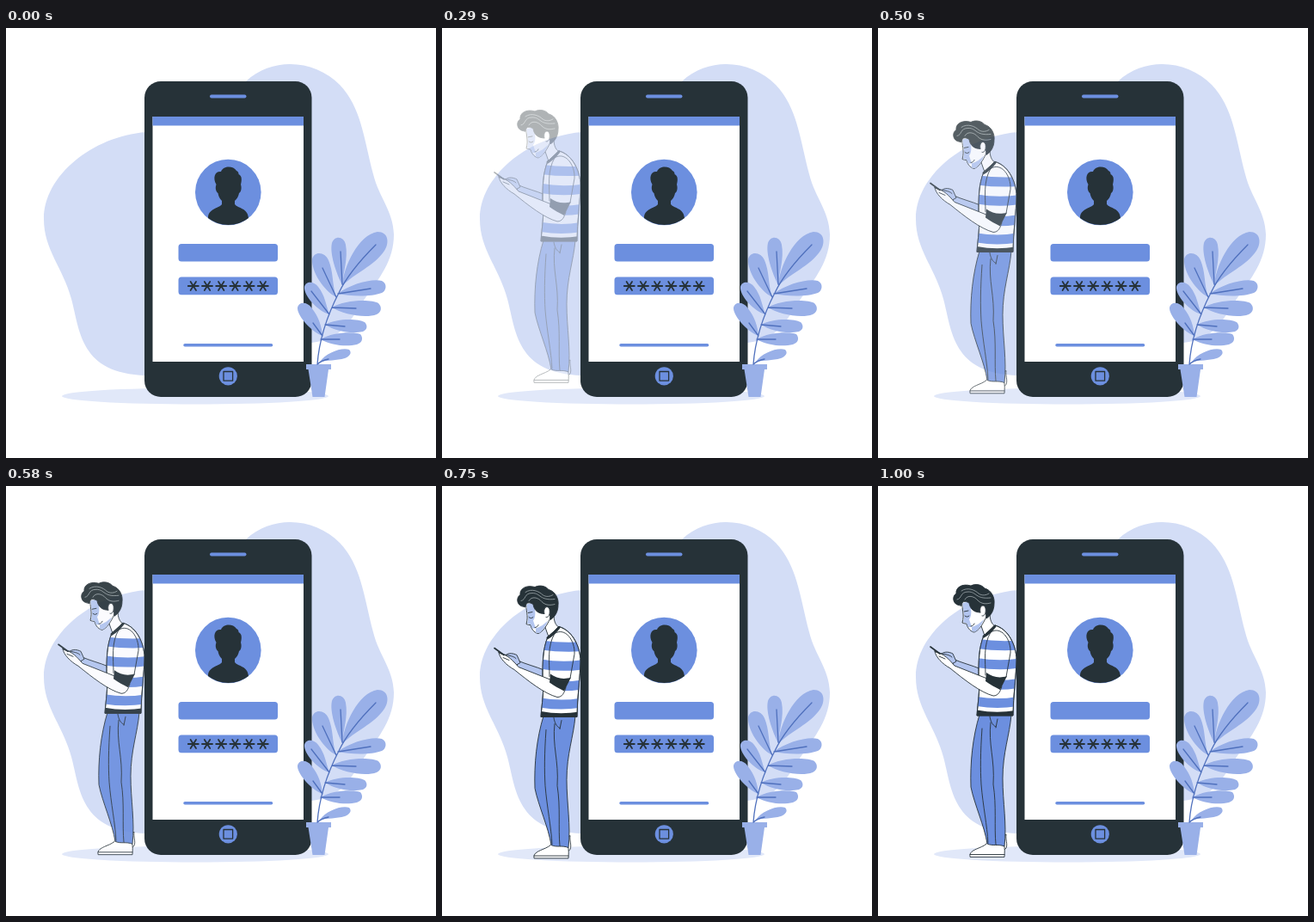
These frames come from a looping animation (500 px wide and 500 px high, 1.04 s). An HTML page:

```html
<!DOCTYPE html>
<html lang="en">
<head>
<meta charset="utf-8">
<title>Login illustration</title>
<style>
  html, body { margin: 0; width: 100%; height: 100%; overflow: hidden; background: #fff; }
  svg { display: block; width: 100vw; height: 100vh; }
  .blue { fill: #6c8fdf; }
  .dark { fill: #263238; }
  .line { fill: none; stroke: #263238; stroke-linecap: round; stroke-linejoin: round; }
  .leaf { fill: #99b0e8; }
  .vein { fill: none; stroke: #4f70bd; stroke-width: 1.3; stroke-linecap: round; }
  #person { stroke: #263238; stroke-width: .9; stroke-linecap: round; stroke-linejoin: round; }
  #person .plain { stroke: none; }
  #person .shade { fill: #b3c5ef; }
</style>
</head>
<body>
<svg viewBox="0 0 500 500">
  <defs>
    <clipPath id="shirtClip">
      <path id="shirt" d="M123 174L136 162C150 166 159 181 161 199C161 222 157 243 157 267L115 267C116 251 119 238 117 222C117 204 117 188 123 174Z"/>
    </clipPath>
    <path id="star" d="M-6 0H6M-3.2 -5L3.2 5M3.2 -5L-3.2 5"/>
  </defs>

  <path fill="#d3ddf6" d="M163 121C100 126 44 172 44 222C44 258 66 278 76 315C86 352 86 402 163 404L355 366C392 362 400 340 415 318C435 290 451 270 451 240C450 212 434 198 427 170C416 128 413 92 388 66C360 38 312 32 279 62Z"/>
  <ellipse cx="220" cy="428" rx="155" ry="9.5" fill="#e1e8f9"/>

  <g id="person" fill="#fff">
    <!-- shoes and trousers -->
    <path d="M144 408L149 405C148 411 151 416 149 421L146 424Z"/>
    <path d="M107 431C106 426 110 424 117 421C122 419 126 417 128 414L146 416C148 421 147 427 147 431Z"/>
    <path fill="none" d="M107 428.5H147"/>
    <path class="blue" d="M118 266H155C153 290 145 310 145 340C145 368 150 393 147 419C140 416 133 419 127 416C124 396 112 370 108 350C107 322 110 292 118 266Z"/>
    <path fill="none" d="M130 268C131 274 133 278 137 280M139 271L137 281M131 275C128 300 136 318 134 347C138 372 135 396 137 417M121 282C119 310 119 330 120 347C122 372 127 395 128 415"/>

    <!-- far arm, hands and handset -->
    <path class="shade" d="M87 201C98 206 108 208 120 213V223L88 211Z"/>
    <path class="shade" d="M74 195C78 192 83 193 87 195L91 204L84 208Z"/>

    <!-- neck and head -->
    <path d="M119 160L124 174C130 173 135 169 136 163C132 160 130 156 130 148Z"/>
    <path d="M98 134C97 143 101 149 98 159C100 160 102 160 103 160C104 166 109 170 112 170C117 168 121 162 124 156L128 148L117 128Z"/>
    <path class="plain shade" d="M98.5 136L107 134C108 142 110 150 106 155L109 164L105 164L103 159.5L99 158.5C102 149 98 143 98.5 136ZM109 169L113 169.5C117 167 121 161 123 155C118 160 115 162 109 164Z"/>
    <path fill="none" d="M101 151C102 152.500 105 152.500 106 151M100 146L105 145M108 163C110 163 111 162 112 160"/>
    <path class="dark" d="M92 138C87 136 86 128 91 125C90 118 98 113 108 116C114 113 121 115 124 119C132 121 136 130 135 137C135 145 131 151 126 154L125 143C121 137 118 141 119 147C113 147 107 144 106 136C101 133 97 134 97 139Z"/>
    <path d="M119 147C117 140 123 136 125 142C126 147 124 152 121 151"/>
    <path fill="none" stroke="#9fa9ad" stroke-width=".8" d="M92 132C98 131 95 123 105 123C115 123 113 132 131 130M97 122C104 117 113 121 117 125C121 128 126 127 129 125M101 132C104 126 112 128 116 133C121 138 127 137 131 136"/>

    <!-- shirt -->
    <use href="#shirt"/>
    <g clip-path="url(#shirtClip)">
      <path fill="none" stroke="#6c8fdf" stroke-width="11" d="M112 183Q139 187 165 185M112 205Q139 210 165 206M112 228Q139 234 165 229M112 250Q139 255 165 250"/>
      <path class="dark plain" d="M112 260Q136 265 160 261V270H112Z"/>
    </g>
    <use href="#shirt" fill="none"/>
    <path fill="none" stroke-width="3" d="M123 175C128 172 132 168 136 163"/>

    <!-- near arm -->
    <path d="M66 192C67 199 75 207 84 212C100 225 119 240 134 244C140 244 142 239 144 233L127 224L89 209C82 201 78 196 66 192Z"/>
    <path fill="none" d="M67 193C75 196 82 195 86 199M71 198L78 201"/>
    <path class="dark plain" d="M126 217C133 222 141 224 150 221L142 237C137 234 130 231 125 227Z"/>
    <path fill="none" d="M131 170C122 185 125 203 125 220M131 170C143 162 155 178 154 194L149 222"/>
    <path fill="none" stroke-width="1.700" d="M61 187L72 195"/>
  </g>

  <!-- phone -->
  <rect class="dark" x="161" y="62" width="194.500" height="367" rx="19"/>
  <path fill="#fff" d="M170.500 103H346V388H170.500Z"/>
  <path class="blue" d="M170.500 103H346V113.500H170.500Z"/>
  <path stroke="#6c8fdf" stroke-width="4" stroke-linecap="round" d="M239 79.500H277.500"/>
  <circle class="blue" cx="258.300" cy="404.800" r="10.600"/>
  <rect class="line" x="253" y="399.500" width="10.600" height="10.600" stroke-width="1.300"/>
  <circle class="blue" cx="258.300" cy="191" r="38.300"/>
  <path class="dark" d="M244.500 182C240 174 243 166 250 167C253 160 264 160 268 166C270 167 270.500 168 270.500 170C275 172 274 178 273 182C274.500 187 273 191 271 192C270 197 268 199 266 201V205C270 210 281 209 282 221A38.300 38.300 0 0 1 235 221C235 210 247 210 251 205V201C248 198 247 195 246.500 192C244 190 243 186 244.500 182Z"/>
  <rect class="blue" x="200.500" y="251" width="115.500" height="20.500" rx="3.500"/>
  <rect class="blue" x="200.500" y="289.500" width="115.500" height="20.800" rx="3.500"/>
  <g id="stars" class="line" stroke-width="1.800"></g>
  <path stroke="#6c8fdf" stroke-width="3.500" stroke-linecap="round" d="M208 368.700H308.500"/>

  <!-- plant -->
  <path class="leaf" d="M391 300C392 278 410 240 432 237C445 237 446 250 440 259C428 277 405 285 391 300Z
    M391 299C384 285 376 262 379 250C382 241 393 242 395 252C398 268 392 284 391 299Z
    M384 313C369 305 355 283 356 269C358 259 371 260 375 270C381 284 379 298 384 313Z
    M386 309C400 298 425 291 437 294C444 297 442 306 437 308C424 313 400 312 386 309Z
    M376 333C362 329 346 311 347 301C349 293 359 295 363 301C371 311 372 322 376 333Z
    M379 325C393 316 425 315 433 320C438 325 436 331 431 333C418 338 392 333 379 325Z
    M371 345C385 337 410 338 417 342C421 346 420 351 415 353C402 356 384 353 371 345Z
    M368 358C353 352 338 333 339 325C341 317 351 319 355 325C364 336 367 347 368 358Z
    M366 362C380 353 405 353 412 356C416 361 414 366 408 368C396 371 378 369 366 362Z
    M365 388C372 378 390 371 399 374C403 378 399 382 394 384C384 387 374 386 365 388Z
    M349 391H378V397H375L370.500 429H356.500L351.500 397H349Z"/>
  <path class="vein" d="M362 391C364 365 371 339 387 308C395 291 410 272 430 252M389 260L391 298M368 279L384 313M386 309L424 303M355 306L376 333M379 325L407 326M371 345L394 347M357 343L368 358M366 362L388 362M362 391C366 387 370 386 375 385"/>
</svg>
<script>
  const LOOP = 1040, STEPS = 25, STEP = LOOP / STEPS + .067;
  const person = document.getElementById('person');

  document.getElementById('stars').innerHTML = [0, 1, 2, 3, 4, 5]
    .map(i => `<use href="#star" x="${217.8 + i * 16.2}" y="300"/>`).join('');

  const bezier = (a, b, s) => 3 * a * s * (1 - s) ** 2 + 3 * b * s * s * (1 - s) + s ** 3;

  // Overshooting ease: cubic-bezier(.36, -.01, .5, 1.38)
  function ease(x) {
    let low = 0, high = 1;
    for (let i = 0; i < 24; i++) {
      const mid = (low + high) / 2;
      if (bezier(.36, .5, mid) < x) low = mid; else high = mid;
    }
    return bezier(-.01, 1.38, high);
  }

  const start = performance.now();
  function draw(now) {
    const t = Math.max(0, now - start) % LOOP;
    const step = Math.floor((t + 4) / STEP);
    const e = ease((step + 1) / STEPS);
    person.setAttribute('opacity', step < 3 ? 0 : Math.min(1, e));
    person.setAttribute('transform', `translate(0 ${30 * (e - 1)})`);
    requestAnimationFrame(draw);
  }
  draw(start);
</script>
</body>
</html>
```
